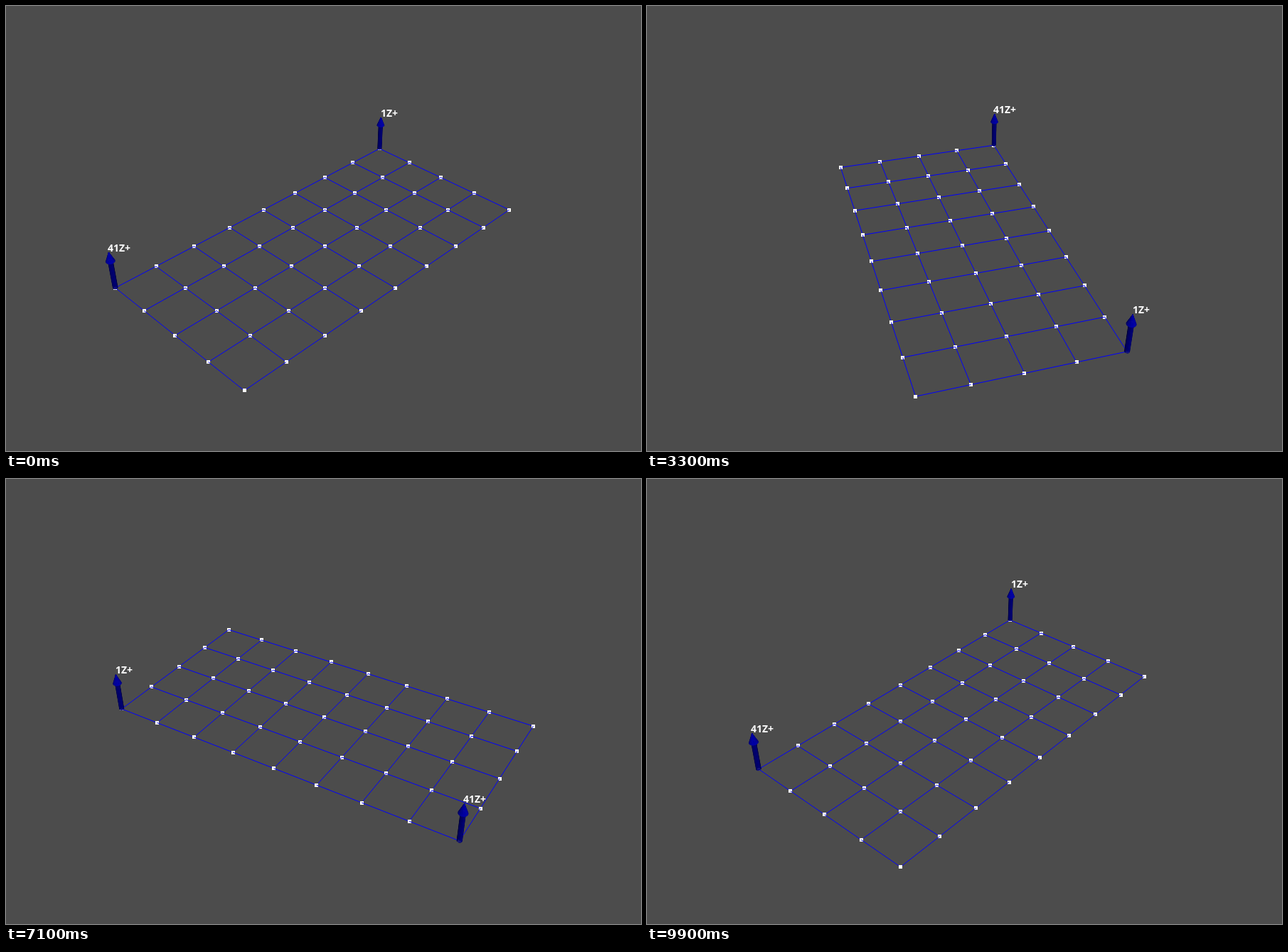
These frames come from a looping animation (893x627 px, 10 s). An HTML page with a canvas:

```html
<!DOCTYPE html>
<html>
<head>
<meta charset="utf-8">
<style>
html, body { margin: 0; width: 100%; height: 100%; overflow: hidden; background: #4c4c4c; }
canvas { display: block; }
</style>
</head>
<body>
<canvas id="stage" width="893" height="627"></canvas>
<script>
const ctx = document.getElementById('stage').getContext('2d');
const CX = 446.5, CY = 313.5;
const FOCAL = CY / Math.tan(Math.PI / 12);
const DIST = 17.753;
const SIN = Math.sqrt(1 / 3), COS = Math.sqrt(2 / 3);   // isometric elevation
const SIDES = 20;
const ARROW = { height: 0.9, neck: 0.675, shaft: 0.045, head: 0.09 };

// Lights fixed to the camera: elevation, azimuth, strength
const LIGHTS = [[50, 10, 0.675], [-75, 0, 0.25], [0, 0, 0.25], [0, 110, 0.214], [0, -110, 0.214]]
  .map(([elev, azim, power]) => {
    const e = elev * Math.PI / 180, a = azim * Math.PI / 180;
    return [Math.sin(a) * Math.cos(e), Math.sin(e), Math.cos(a) * Math.cos(e)].map(v => v * power);
  });

let ca, sa;   // cosine and sine of the turn

// Grid direction to camera axes: right, up, toward the viewer
function turn(x, y, z) {
  const near = y * ca - x * sa;
  return [x * ca + y * sa, z * COS - near * SIN, near * COS + z * SIN];
}

function project(x, y, z) {
  const [right, up, near] = turn(x, y + 0.045, z - 0.45);
  const scale = FOCAL / (DIST - near);
  return { x: CX + right * scale, y: CY - up * scale, near };
}

function shade(normal) {
  let sum = 0;
  for (const l of LIGHTS) sum += Math.max(0, l[0] * normal[0] + l[1] * normal[1] + l[2] * normal[2]);
  return `rgb(0,0,${Math.round(255 * Math.min(1, sum))})`;
}

// Side faces of an upright tapered prism
function drawPrism(x, y, z0, r0, z1, r1) {
  const slope = Math.hypot(r0 - r1, z1 - z0);
  const flat = (z1 - z0) / slope, rise = (r0 - r1) / slope;
  const step = 2 * Math.PI / SIDES;
  const faces = [];
  for (let i = 0; i < SIDES; i++) {
    const a = i * step, b = a + step, mid = a + step / 2;
    const corner = (ang, r, z) => project(x + r * Math.cos(ang), y + r * Math.sin(ang), z);
    faces.push({
      normal: turn(flat * Math.cos(mid), flat * Math.sin(mid), rise),
      points: [corner(a, r0, z0), corner(b, r0, z0), corner(b, r1, z1), corner(a, r1, z1)]
    });
  }
  faces.sort((p, q) => p.normal[2] - q.normal[2]);
  ctx.lineWidth = 0.4;
  for (const { normal, points } of faces) {
    ctx.fillStyle = ctx.strokeStyle = shade(normal);
    ctx.beginPath();
    for (const p of points) ctx.lineTo(p.x, p.y);
    ctx.closePath();
    ctx.fill();
    ctx.stroke();
  }
}

function drawArrow(x, y, text, shift) {
  const { height, neck, shaft, head } = ARROW;
  drawPrism(x, y, 0, shaft, neck, shaft);
  drawPrism(x, y, neck, head, height, 0);
  const tip = project(x, y, height);
  ctx.fillStyle = '#fff';
  ctx.fillText(text, Math.round(tip.x + shift), Math.round(tip.y - 1.5));
}

function drawGrid() {
  const nodes = [];
  for (let i = 0; i < 9; i++)
    for (let j = 0; j < 5; j++) nodes.push({ i, j, ...project(4 - i, j - 2, 0) });
  const links = (p, q) => Math.abs(p.i - q.i) + Math.abs(p.j - q.j) === 1;
  nodes.sort((p, q) => p.near - q.near);
  ctx.strokeStyle = '#00f';
  ctx.fillStyle = '#fff';
  ctx.lineWidth = 1;
  // Far to near, so lines cover their far node and pass under their near one
  nodes.forEach((p, k) => {
    ctx.fillRect(Math.round(p.x - 2.5), Math.round(p.y - 2.5), 5, 5);
    ctx.beginPath();
    for (const q of nodes.slice(k + 1)) {
      if (!links(p, q)) continue;
      ctx.moveTo(p.x, p.y);
      ctx.lineTo(q.x, q.y);
    }
    ctx.stroke();
  });
}

function draw(now) {
  const step = Math.floor(now / 100) % 100;
  const angle = (45 - 3.6 * step) * Math.PI / 180;
  ca = Math.cos(angle);
  sa = Math.sin(angle);
  ctx.fillStyle = '#4c4c4c';
  ctx.fillRect(0, 0, 893, 627);
  ctx.font = 'bold 14px "Open Sans", "Noto Sans", sans-serif';
  drawGrid();
  drawArrow(4, -2, '1Z+', 0);
  drawArrow(-4, -2, '41Z+', -1.5);
}

const start = performance.now();
function loop() {
  draw(performance.now() - start);
  requestAnimationFrame(loop);
}
loop();
</script>
</body>
</html>
```
